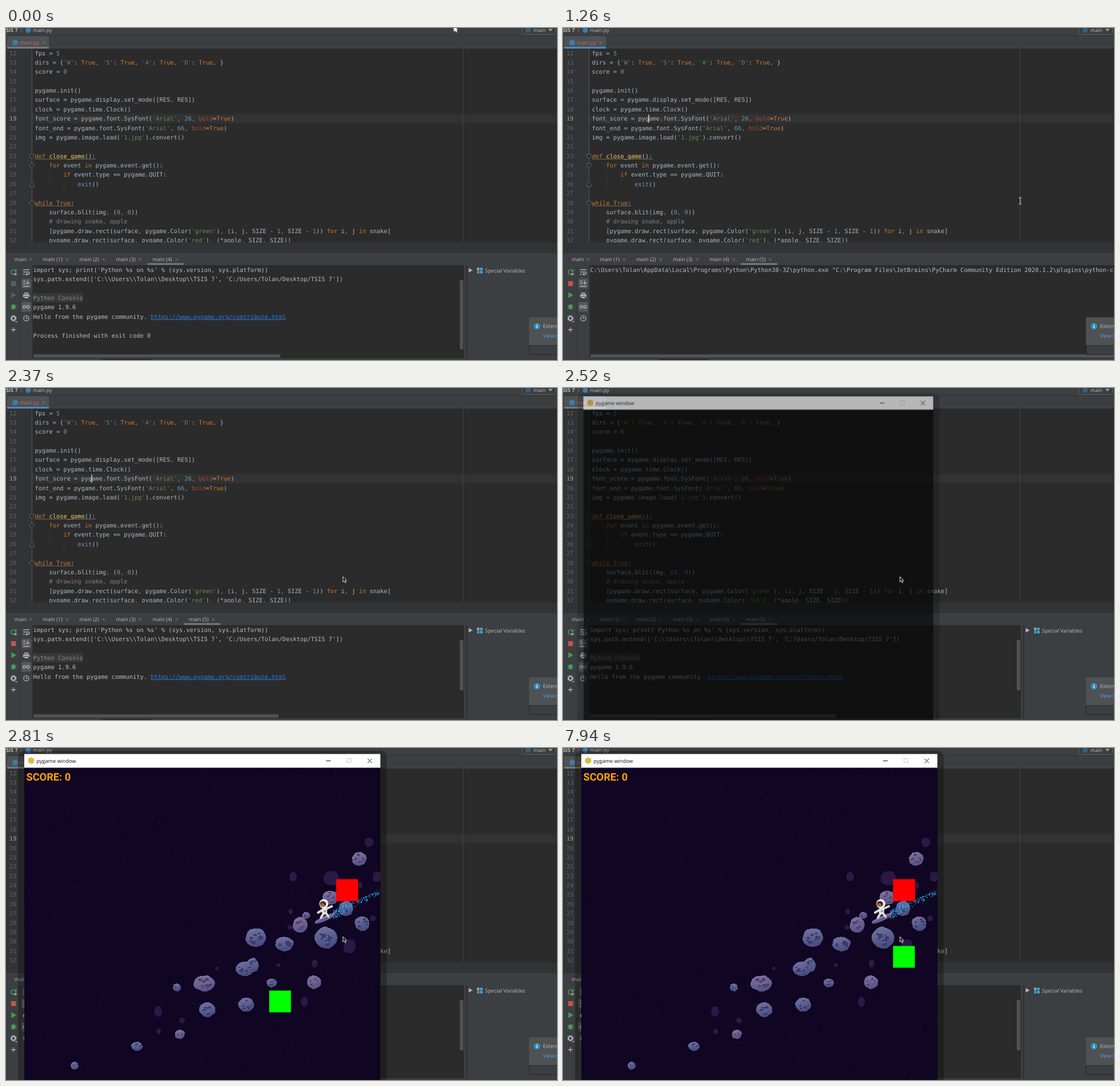
Recreate the animation shown at these times as an HTML page. Size 964 by 581 pixels, loop 8000 ms.

```html
<!DOCTYPE html>
<html lang="en">
<head>
<meta charset="utf-8">
<title>Snake run</title>
<style>
html, body { margin: 0; width: 100%; height: 100%; overflow: hidden; background: #2b2b2b; }
svg { display: block; width: 964px; height: 581px; }
text { white-space: pre; text-rendering: geometricPrecision; font: 10.35px "DejaVu Sans Mono", monospace; fill: #a9b7c6; }
.ui { font: 9.1px "Open Sans", "Noto Sans", sans-serif; fill: #bbb; }
.out { fill: #bbb; }
.num { fill: #606366; }
.now { fill: #a4a3a3; }
.kw { fill: #cc7832; }
.str { fill: #6a8759; }
.lit { fill: #6897bb; }
.arg { fill: #aa4926; }
.com { fill: #808080; }
.fn { fill: #ffc66d; }
.std { fill: #8888c6; }
.link { fill: #287bde; text-decoration: underline; }
.score { font: bold 18.2px Roboto, "Liberation Sans", sans-serif; fill: #ffa500; }
.line { fill: none; stroke: #afb1b3; stroke-width: 1.3; }
.bar { fill: #505152; }

.a { animation: 8s step-end infinite; }
.focus { animation-name: focus; }
.caret { animation-name: caret; }
.past { animation-name: past; }
.run { animation-name: run; }
.cmd { animation-name: cmd; }
.wide { animation-name: wide; }
.pane { animation-name: pane; }
.out1 { animation-name: out1; }
.out2 { animation-name: out2; }
.out3 { animation-name: out3; }
.vbar { animation-name: vbar; }
.hbar { animation-name: hbar; }
.top { animation-name: top; }
.beam { animation-name: beam; }
.arrow { animation-name: arrow; }
.win { animation-name: win; }
.game { animation-name: game; }
.snake { animation-name: snake; }
@keyframes focus { 0% { opacity: 0 } 1.875% { opacity: 1 } 31.5%, to { opacity: 0 } }
@keyframes caret {
  0%, 10.625%, 22.75%, 31.5%, to { opacity: 0 }
  1.875%, 15.75%, 27.875% { opacity: 1 }
}
@keyframes past { 0% { opacity: 1 } 3.75%, to { opacity: 0 } }
@keyframes run { 0% { opacity: 0 } 3.75%, to { opacity: 1 } }
@keyframes cmd { 0% { opacity: 0 } 3.75% { opacity: 1 } 19.375%, to { opacity: 0 } }
@keyframes wide { 0% { opacity: 0 } 3.75% { opacity: 1 } 17.5%, to { opacity: 0 } }
@keyframes pane { 0% { opacity: 1 } 3.75% { opacity: 0 } 17.5%, to { opacity: 1 } }
@keyframes out1 { 0% { opacity: 1 } 3.75% { opacity: 0 } 19.375%, to { opacity: 1 } }
@keyframes out2 { 0% { opacity: 1 } 3.75% { opacity: 0 } 22.75%, to { opacity: 1 } }
@keyframes out3 { 0% { opacity: 1 } 3.75% { opacity: 0 } 27.875%, to { opacity: 1 } }
@keyframes vbar { 0% { opacity: 0 } 27.875%, to { opacity: 1 } }
@keyframes hbar { 0% { opacity: 0 } 17.5% { opacity: 1 } 19.375% { opacity: 0 } 22.75%, to { opacity: 1 } }
@keyframes top { 0% { opacity: 1 } 7.25%, to { opacity: 0 } }
@keyframes beam {
  0% { opacity: 0; transform: translate(866px, 120px) }
  7.25% { opacity: 1; transform: translate(866px, 120px) }
  8.875% { opacity: 1; transform: translate(808px, 165px) }
  14.125% { opacity: 1; transform: translate(804px, 236px) }
  15.75% { opacity: 1; transform: translate(800px, 302.5px) }
  26.25% { opacity: 1; transform: translate(696px, 318px) }
  27.875% { opacity: 1; transform: translate(592px, 332.5px) }
  29.625%, to { opacity: 0; transform: translate(592px, 332.5px) }
}
@keyframes arrow { 0% { opacity: 0 } 29.625%, to { opacity: 1 } }
@keyframes win {
  0% { opacity: 0; transform: none }
  31.5% { opacity: .63; transform: translate(4.6px, 4.2px) scale(.982) }
  33.125% { opacity: .92; transform: translate(1.2px, 1px) scale(.996) }
  35.125%, to { opacity: 1; transform: none }
}
@keyframes game { 0% { opacity: 0 } 35.125%, to { opacity: 1 } }
@keyframes snake {
  0% { transform: none }
  88.625% { transform: translate(0, -39px) }
  92% { transform: translate(0, -78px) }
  93.875% { transform: translate(39px, -78px) }
  97.375% { transform: translate(78px, -78px) }
  99.25%, to { transform: translate(117px, -78px) }
}
</style>
</head>
<body>
<svg id="stage" viewBox="0 0 964 581"></svg>
<script>
const CH = 6.23, ROW = 16.37;

let seed = 11;
const rnd = () => (seed = (seed * 16807) % 2147483647) / 2147483647;
const times = (n, f) => Array.from({ length: n }, (_, i) => f(i)).join('');
const rect = (x, y, w, h, fill, more = '') => `<rect x="${x}" y="${y}" width="${w}" height="${h}" fill="${fill}" ${more}/>`;
const path = (d, more = 'class="line"') => `<path d="${d}" ${more}/>`;
const dot = (x, y, r, fill) => `<circle cx="${x}" cy="${y}" r="${r}" fill="${fill}"/>`;
const oval = (x, y, rx, ry, fill, more = '') => `<ellipse cx="${x}" cy="${y}" rx="${rx}" ry="${ry}" fill="${fill}" ${more}/>`;
const text = (x, y, s, cls = '', more = '') => `<text x="${x}" y="${y}" class="${cls}" ${more}>${s}</text>`;
const anim = (name, s) => `<g class="a ${name}">${s}</g>`;
const cross = (x, y, r, color) => path(`M${x - r} ${y - r}l${2 * r} ${2 * r}m0 ${-2 * r}l${-2 * r} ${2 * r}`, `stroke="${color}" fill="none"`);

// ---- editor ----
const code = `fps = 5
dirs = {'W': True, 'S': True, 'A': True, 'D': True, }
score = 0

pygame.init()
surface = pygame.display.set_mode([RES, RES])
clock = pygame.time.Clock()
font_score = pygame.font.SysFont('Arial', 26, bold=True)
font_end = pygame.font.SysFont('Arial', 66, bold=True)
img = pygame.image.load('1.jpg').convert()

def close_game():
    for event in pygame.event.get():
        if event.type == pygame.QUIT:
            exit()

while True:
    surface.blit(img, (0, 0))
    # drawing snake, apple
    [pygame.draw.rect(surface, pygame.Color('green'), (i, j, SIZE - 1, SIZE - 1)) for i, j in snake]
    pygame.draw.rect(surface, pygame.Color('red'), (*apple, SIZE, SIZE))`.split('\n');

const token = /(?<com>#.*)|(?<str>'[^']*')|(?<kw>\b(?:def|for|in|if|while|True)\b|,)|(?<arg>\bbold\b)|(?<lit>\b\d+\b)|(?<std>\bexit\b)|(?<fn>\bclose_game\b)/g;
const paint = s => s.replace(token, (m, ...rest) => {
  const groups = rest.at(-1);
  return `<tspan class="${Object.keys(groups).find(k => groups[k])}">${m}</tspan>`;
});

function codeLine(s, i) {
  const y = 47.6 + i * ROW, body = s.trimStart();
  return text(6, y, i + 12, i === 7 ? 'now' : 'num') +
    text(50.6 + (s.length - body.length) * CH, y, paint(body));
}
const fold = (y, up) => path(up ? `M42 ${y + 4}v-5l3.5-3 3.5 3v5z` : `M42 ${y - 4}v5l3.5 3 3.5-3v-5z`, 'fill="#2b2b2b" stroke="#606366"');
const hint = (y, x2) => path(`M51 ${y}H${x2}`, 'stroke="#9a8f68" stroke-dasharray="1.5 1"');

const editor =
  rect(0, 0, 964, 36, '#3c3f41') + rect(0, 13, 964, 1, '#323232') +
  text(0, 7, 'SIS 7', 'ui', 'style="font-weight:bold"') + path('M25 0l3 4-3 4', 'fill="none" stroke="#777"') +
  dot(39, 4, 4.5, '#3f7cac') + text(47, 7, 'main.py', 'ui') +
  rect(902.5, -8, 59, 19.5, '#3c3f41', 'rx="3" stroke="#5e6060"') +
  dot(913.5, 4, 4.5, '#365f80') + text(922.5, 7, 'main', 'ui') + path('M948.5 1.5h8l-4 4.5z', 'fill="#9a9da0"') +
  rect(2, 14, 73, 21, '#4e5254') + dot(16, 25.5, 5, '#3f7cac') +
  text(24, 29, 'main.py', 'ui', 'style="fill:#d1675a"') + cross(65.5, 25.5, 2.5, '#777b7e') +
  rect(2, 33, 73, 3, '#747a80') + anim('focus', rect(2, 33, 73, 3, '#4a88c7')) +
  rect(0, 36, 964, 339, '#2b2b2b') + rect(0, 36, 45, 339, '#313335') +
  rect(46, 150.5, 918, 16, '#323232') + rect(45, 36, 1, 339, '#555') + rect(799, 36, 1, 339, '#444') +
  rect(76, 249, 1, 32, '#373737') + rect(101, 265, 1, 16, '#373737') +
  `<g clip-path="url(#code)">${code.map(codeLine).join('')}</g>` +
  hint(229.5, 157) + hint(311.5, 119) +
  fold(224.5) + fold(241) + fold(273.5, true) + fold(307) +
  anim('caret', rect(149.3, 151.5, 1.4, 14, '#ddd'));

// ---- run console ----
const tab = i => {
  const x = i ? 64.5 + (i - 1) * 63.9 : 15;
  return text(x, 408, i ? `main (${i})` : 'main', 'ui') + cross(i ? x + 42.5 : 43.5, 405, 2.5, '#73777a');
};
const out = (row, s, more = '') => text(47.6, 426.8 + row * 16.4, s, 'out', more);
const play = color => path('M9.5 462.5l8.5 5-8.5 5z', `fill="${color}"`);
const stop = color => rect(9, 443, 8.5, 8.5, color);

const icons =
  path('M16.5 424.5a4.2 4.2 0 1 0 .6 4.500', 'fill="none" stroke="#499c54" stroke-width="1.7"') +
  path('M18.500 421.500v5h-5z', 'fill="#499c54"') + rect(14.500, 428.500, 4, 4, '#9a9da0') +
  oval(13, 488, 3.4, 4.500, '#499c54') + path('M8 484.500l10 7m-10.500-3.500h11m-10.500 3.500l10-7', 'stroke="#499c54"') +
  `<circle cx="13" cy="508" r="3.3" class="line" style="stroke-width:2.2"/><circle cx="13" cy="508" r="4.800" class="line" stroke-dasharray="2 1.770"/>` +
  path('M16 513h4l-2 2.500z', 'fill="#afb1b3"') + path('M9 528h8m-4-4v8') +
  rect(27, 438.500, 17, 17, '#54585a', 'rx="3"') + rect(27, 479.500, 17, 17, '#54585a', 'rx="3"') +
  path('M30 423h11M30 427h8.500q2.500 0 2.500 2t-2.500 2h-3m1.500-2l-2 2 2 2M30 431h3') +
  path('M30 443h4m-4 4h4M30 452h11M38 442v6m-2.500-2.500l2.500 2.500 2.500-2.500') +
  path('M32 463h7v2h-7zM30 466h11v5h-2v-2h-7v2h-2zM32.500 470h6v3h-6z', 'fill="#afb1b3"') +
  `<circle cx="32.300" cy="488" r="2.300" class="line"/><circle cx="38.700" cy="488" r="2.300" class="line"/>` +
  `<circle cx="35.500" cy="508" r="4.600" class="line"/>` + path('M35.500 505v3.300h2.500');

const tool =
  rect(0, 375, 964, 18, '#313335') + rect(0, 393, 964, 188, '#3c3f41') + rect(0, 393, 964, 1, '#323232') +
  rect(47, 415, 917, 163, '#2b2b2b') + rect(24, 415, 1, 163, '#323232') + rect(46, 415, 1, 163, '#323232') +
  rect(168, 579, 87, 2, '#2b2b2b') +
  times(5, tab) + icons +
  anim('past', rect(247.5, 411.5, 63.5, 3, '#747a80') + stop('#5c5f61') + play('#5c5f61') +
    out(7, 'Process finished with exit code 0') + rect(48, 571, 432, 6, '', 'class="bar"') + rect(794, 441, 6, 121, '', 'class="bar"')) +
  anim('run', tab(5) + rect(311, 411.5, 64, 3, '#747a80') + stop('#c75450') + play('#499c54')) +
  anim('cmd', out(0, String.raw`C:\Users\Tolan\AppData\Local\Programs\Python\Python38-32\python.exe "C:\Program Files\JetBrains\PyCharm Community Edition 2020.1.2\plugins\python-console.py"`)) +
  anim('wide', rect(48, 571, 916, 6, '', 'class="bar"')) +
  anim('out1', out(0, "import sys; print('Python %s on %s' % (sys.version, sys.platform))") +
    out(1, String.raw`sys.path.extend(['C:\\Users\\Tolan\\Desktop\\TSIS 7', 'C:/Users/Tolan/Desktop/TSIS 7'])`)) +
  anim('out2', rect(47, 464, 87.5, 16, '#373838') + out(3, 'Python Console', 'style="fill:#8c8c8c"')) +
  anim('out3', out(4, 'pygame 1.9.6') +
    out(5, 'Hello from the pygame community. <tspan class="link">https://www.pygame.org/contribute.html</tspan>')) +
  anim('hbar', rect(48, 571, 429, 6, '', 'class="bar"')) +
  anim('vbar', rect(794, 441, 6, 88, '', 'class="bar"')) +
  anim('pane', rect(801, 415, 163, 163, '#3c3f41') + rect(805.5, 415, 1.5, 163, '#2b2b2b') +
    anim('out1', path('M809.500 420l7 4-7 4z', 'fill="#b0b2b4"') +
      rect(824, 419.5, 4, 4.5, '#9aa7b0') + rect(829, 419.5, 5, 4.5, '#40a0c8') +
      rect(824, 425, 4, 4.5, '#40a0c8') + rect(829, 425, 5, 4.5, '#40a0c8') +
      text(838, 428, 'Special Variables', 'ui'))) +
  rect(915.5, 555, 60, 16.5, '#3c3f41', 'stroke="#232425"') + rect(915, 506.5, 50, 48.5, '#4e5254') +
  dot(929, 522, 5.5, '#3592c4') + rect(928.3, 521, 1.4, 4, '#fff') + rect(928.3, 518.5, 1.4, 1.4, '#fff') +
  text(939.5, 525.3, 'Externally', 'ui') + text(939.5, 542, 'View It', 'ui', 'style="fill:#589df6"');

// ---- game window ----
function blob(x, y, rx, ry, fill) {
  const pts = Array.from({ length: 15 }, (_, i) => {
    const a = i / 15 * 2 * Math.PI, k = .93 + rnd() * .13;
    return (x + Math.cos(a) * rx * k).toFixed(1) + ',' + (y + Math.sin(a) * ry * k).toFixed(1);
  });
  return `<polygon points="${pts.join(' ')}" fill="${fill}"/>`;
}
function rock([x, y, rx, ry, tint]) {
  const [dark, hi] = tint ? ['#4c4270', '#8a7aa3'] : ['#393c6c', '#7779a3'];
  return blob(x, y, rx, ry, `url(#rock${tint})`) + times(Math.round(3 + rx / 3), () => {
    const a = rnd() * 6.28, d = .25 + rnd() * .42, r = rx * (.1 + rnd() * .12);
    const cx = x + Math.cos(a) * rx * d, cy = y + Math.sin(a) * ry * d;
    return oval(cx - .8, cy - .8, r * 1.15, r * .9, hi, 'opacity=".6"') + oval(cx, cy, r * 1.1, r * .8, dark);
  });
}
const rocks = [
  [618, 194, 13, 12, 1], [567, 262, 13, 13, 1], [595, 281, 13, 13, 0], [623, 307, 13, 13, 0],
  [525, 293, 7, 6, 0], [515, 310, 13, 14, 1], [560, 332, 20, 19, 0], [437, 332, 18, 17, 0],
  [487, 343, 16, 13, 0], [418, 386, 16, 13, 0], [431, 380, 11, 13, 0], [347, 412, 19, 14, 1],
  [299, 419, 7, 7, 0], [465, 411, 9, 8, 0], [539, 410, 12, 12, 1], [420, 449, 14, 13, 0],
  [352, 458, 14, 13, 0], [304, 501, 9, 8, 1], [229, 522, 10, 8, 0], [120, 556, 7, 7, 0]
];
const shades = [
  [635, 165, 8, 8], [569, 228, 14, 13], [502, 225, 7, 8], [649, 225, 8, 9], [498, 286, 4, 5],
  [497, 314, 5, 4], [642, 298, 5, 5], [601, 347, 11, 13], [540, 377, 5, 7], [477, 380, 4, 3],
  [369, 386, 3, 3], [522, 444, 6, 9], [266, 461, 7, 9], [308, 477, 5, 5], [267, 496, 4, 5], [619, 240, 4, 6]
];

const stars = times(230, () => rect((32 + rnd() * 622).toFixed(1), (36 + rnd() * 544).toFixed(1), 1.1, 1.1,
  ['#3a3164', '#4d4478', '#2b3c6e'][rnd() * 3 | 0]));
const trail = times(210, () => {
  const t = rnd() ** 1.7, w = 16 * (1 - t * .5);
  return rect((572 + t * 84).toFixed(1), (291 - t * 42 + (rnd() - .5) * w).toFixed(1), 1.5, 1.5,
    ['#2291d6', '#38b8f0', '#23609f'][rnd() * 3 | 0]);
});
const rider =
  oval(558.5, 298, 20, 4.5, '#655b8d', 'transform="rotate(-25 558.5 298)"') +
  path('M541 304L576 288', 'stroke="#8a82ad" stroke-width="1.500"') +
  path('M556 282L546 288M559 282L570 277M555 290L551 297M560 289L564 295', 'stroke="#d8d8d4" stroke-width="4" stroke-linecap="round"') +
  oval(557, 285, 5, 6.5, '#e6e6e0') + rect(556, 284, 4, 3, '#8f98a8') +
  dot(556, 272.5, 8, '#eeeee8') + oval(554.5, 273, 5.5, 5, '#3b2b31') + oval(553.5, 274.5, 4, 3.2, '#b06c3e') +
  rect(551.5, 272, 1.5, 1.5, '#16101a') + rect(555.5, 272, 1.5, 1.5, '#16101a');

const win =
  rect(21, 5, 645, 690, '#000', 'rx="10" opacity=".27"') +
  rect(32, 34, 623, 630, '#000') +
  anim('game', `<g clip-path="url(#field)">` + rect(32, 34, 623, 630, '#100522') + stars +
    `<g shape-rendering="crispEdges">` + shades.map(s => blob(...s, '#2a1947')).join('') + rocks.map(rock).join('') + trail + '</g>' + rider +
    anim('snake', rect(460.5, 424.5, 38, 38, '#0f0')) + rect(577.5, 229.5, 38.5, 38.5, '#f00') +
    text(35.5, 57.3, 'SCORE: 0', 'score') + '</g>') +
  rect(32, 10.5, 623, 24, '#fff') + dot(44, 22, 5.5, '#d9bd3c') +
  text(53.5, 25.5, 'pygame window', 'ui', 'style="fill:#111"') +
  rect(560, 22, 8, 1, '#111') + rect(596.5, 18.5, 7, 7, 'none', 'stroke="#ccc"') + cross(636.5, 22.5, 3.8, '#111');

// ---- pointer ----
const pointer = (x, y, fill) => path(`M${x} ${y}v9.500l2.200-2 1.700 3.500 1.400-.7-1.600-3.300h2.900z`, `fill="${fill}" stroke="#e8e8e8" stroke-width=".9"`);
const beam = path('M-2.500-5.500h2l.5.500.5-.5h2M0-5V5M-2.500 5.500h2l.5-.5.5.5h2', 'fill="none" stroke="#e0e0e0"');

const fade = (id, a, b) => `<linearGradient id="${id}" x1=".3" y1="0" x2=".6" y2="1"><stop stop-color="${a}"/><stop offset="1" stop-color="${b}"/></linearGradient>`;
document.getElementById('stage').innerHTML =
  `<defs><clipPath id="code">${rect(0, 36, 964, 339, '#000')}</clipPath><clipPath id="field">${rect(32, 34, 623, 560, '#000')}</clipPath>` +
  fade('rock0', '#7173a0', '#45487c') + fade('rock1', '#84719b', '#544f82') + '</defs>' +
  editor + tool + anim('win', win) +
  anim('top', pointer(783.7, -3.7, '#fff')) + anim('beam', beam) + anim('arrow', pointer(589.5, 330, '#1c1c1c'));
</script>
</body>
</html>
```
